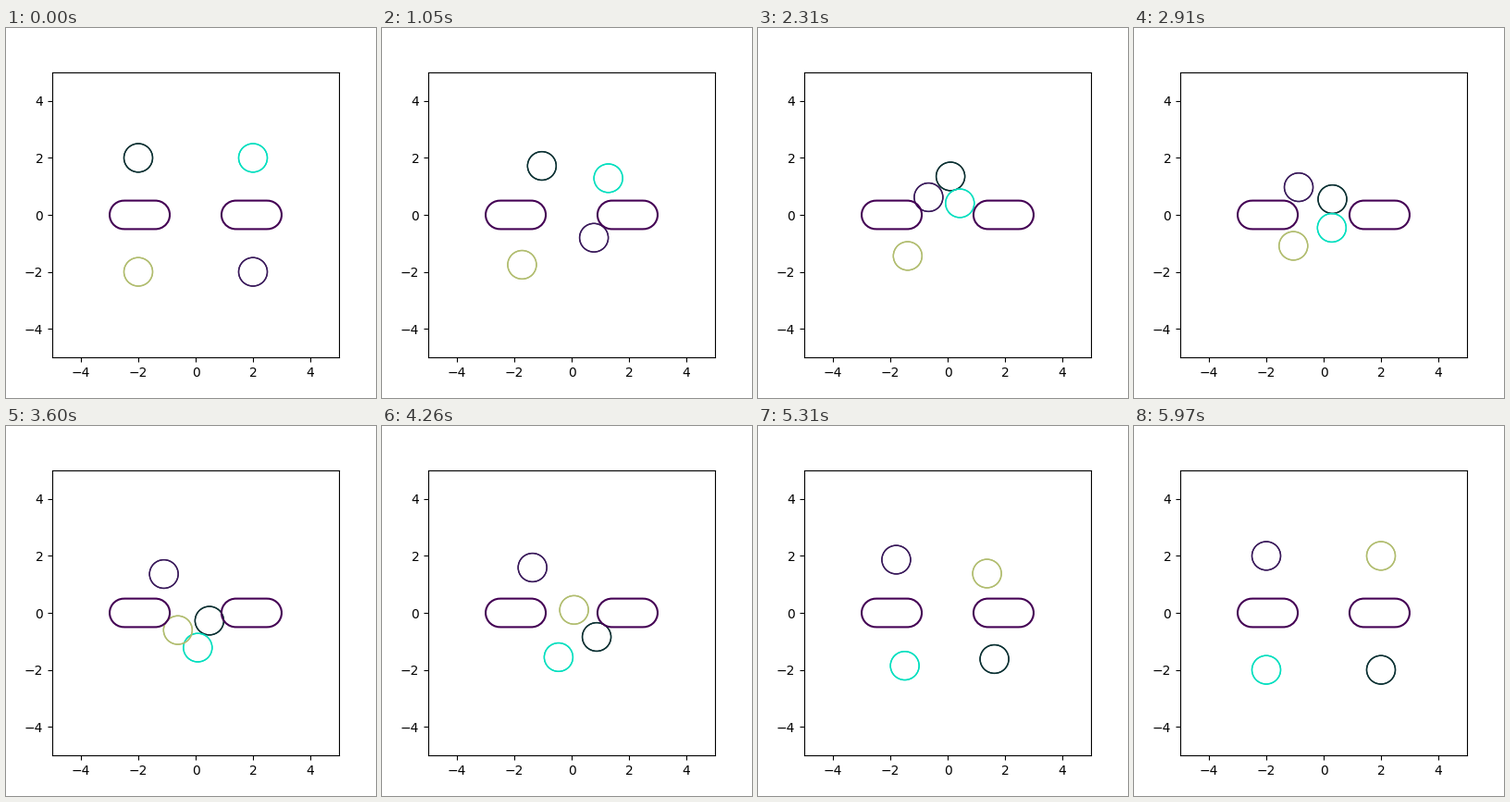
A matplotlib script for the animation above (6 s loop, 400 by 400 pixels).

```python
import matplotlib.pyplot as plt
import numpy as np
from matplotlib.animation import FuncAnimation

FRAMES, INTERVAL = 200, 30
RADIUS = 0.5
BRAKE = 189

# Shared times of the turns; every robot crosses to the opposite corner.
TURNS = [0, 76, 97, 126, 194]
ROBOTS = [
    # color, start corner, turning points in the gap
    ("#0a3032", (-2, 2), [(0.09, 1.39), (0.306, 0.55), (0.526, -0.49)]),
    ("#00dfbf", (2, 2), [(0.435, 0.45), (0.285, -0.455), (0.02, -1.42)]),
    ("#b1bd6f", (-2, -2), [(-1.41, -1.46), (-1.055, -1.088), (-0.505, -0.48)]),
    ("#39195a", (2, -2), [(-0.655, 0.6), (-0.87, 0.97), (-1.17, 1.465)]),
]


def draw_obstacles(ax):
    """Two capsules, as the outline at one distance from their core lines."""
    x, y = np.meshgrid(np.linspace(-5, 5, 100), np.linspace(-5, 5, 100))
    beyond = np.maximum(np.abs(np.abs(x) - 1.95) - 0.55, 0)
    ax.contour(x, y, np.hypot(beyond, y), levels=[RADIUS],
               colors="#440154", linewidths=1.5)


def position(start, turns, step):
    clock = step - max(0, step - BRAKE) / 2  # half speed near the goal
    goal = -np.array(start)
    xs, ys = np.transpose([start, *turns, goal])
    return np.interp(clock, TURNS, xs), np.interp(clock, TURNS, ys)


def add_ring(ax, color):
    return ax.add_patch(plt.Circle((0, 0), RADIUS, fill=False,
                                   edgecolor=color, lw=1))


fig, ax = plt.subplots(figsize=(4, 4), dpi=100)
draw_obstacles(ax)
ax.set(xlim=(-5, 5), ylim=(-5, 5),
       xticks=range(-4, 5, 2), yticks=range(-4, 5, 2))

# Each ring is stroked twice for a firm edge.
rings = [[add_ring(ax, color) for _ in range(2)] for color, *_ in ROBOTS]


def update(step):
    for pair, (_, start, turns) in zip(rings, ROBOTS):
        for ring in pair:
            ring.center = position(start, turns, step)
    return sum(rings, [])


anim = FuncAnimation(fig, update, frames=FRAMES, interval=INTERVAL,
                     repeat=True, repeat_delay=0)
plt.show()
```
